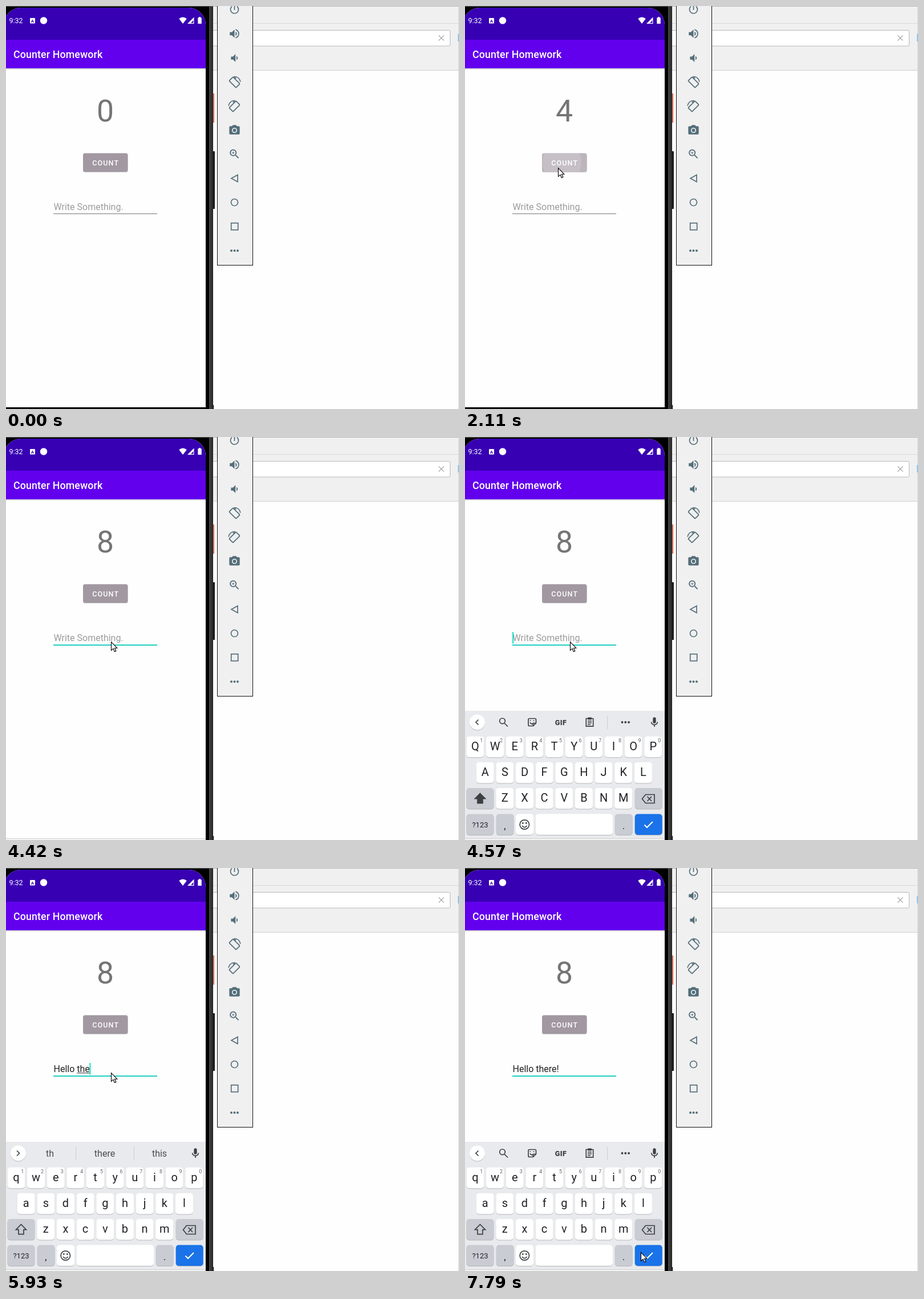
An HTML page for the animation above (8 s loop, 794 by 705 pixels).

```html
<!DOCTYPE html>
<html lang="en">
<head>
<meta charset="utf-8">
<title>Counter</title>
<style>
  html, body { margin: 0; width: 100%; height: 100%; overflow: hidden; background: #fefefe; }
  svg { display: block; width: 794px; height: 705px; }
  text { font-family: Roboto, "Open Sans", sans-serif; white-space: pre; }
  .mid { text-anchor: middle; }
  .line { fill: none; stroke: #546e7a; stroke-width: 1.7; }
  .dark { fill: none; stroke: #3c4043; stroke-width: 1.7; }
  .key { filter: drop-shadow(0 1px .4px rgba(0, 0, 0, .22)); }
  .hint { font-size: 9px; fill: #5f6368; }
  .word { font-size: 16px; fill: #474b50; text-anchor: middle; }
</style>
</head>
<body>
<svg viewBox="0 0 794 705">
  <defs>
    <clipPath id="screen"><path d="M-4 705V33A30 30 0 0 1 26 3H320A30 30 0 0 1 350 33V705Z"/></clipPath>
    <clipPath id="buttonClip"><rect x="135" y="257.5" width="78.5" height="32.5" rx="3.5"/></clipPath>
    <linearGradient id="barShadow" x2="0" y2="1">
      <stop stop-color="#000" stop-opacity=".2"/><stop offset="1" stop-color="#000" stop-opacity="0"/>
    </linearGradient>
  </defs>

  <!-- browser behind -->
  <rect width="794" height="705" fill="#fefefe"/>
  <rect x="363" width="431" height="112" fill="#f0f0f0"/>
  <path d="M363 .5H794" stroke="#b4b4b4"/>
  <path d="M363 30.5H794" stroke="#d9d9d9"/>
  <path d="M363 112.5H794" stroke="#cfcfcf"/>
  <path d="M793.5 0V705" stroke="#d4d4d4"/>
  <rect x="340.5" y="42.5" width="438" height="27.5" rx="2" fill="#fff" stroke="#b8b8b8"/>
  <path d="M758.5 51.5l9 9m0-9l-9 9" stroke="#a2a2a2" stroke-width="1.2"/>
  <path d="M793 49V62" stroke="#8fc3ee" stroke-width="2"/>
  <rect x="362" y="153" width="3.2" height="51" fill="#e2765f"/>

  <!-- phone -->
  <rect width="357" height="705" fill="#000"/>
  <path d="M0 .5H363" stroke="#666"/>
  <rect x="356" y="1" width="7" height="704" fill="#333"/>
  <path d="M357 1V705" stroke="#5a5a5a"/>
  <path d="M362.5 1V705" stroke="#1c1c1c"/>
  <rect x="362" y="254" width="4" height="101" rx="1" fill="#1d1d1d"/>
  <rect x="363" y="698" width="1.2" height="7" fill="#222"/>
  <g clip-path="url(#screen)">
    <rect y="3" width="350" height="699" fill="#fefefe"/>
    <rect x="-4" y="3" width="354" height="56" fill="#3700b3"/>
    <rect y="59" width="350" height="50" fill="#6200ee"/>
    <rect y="109" width="350" height="3" fill="url(#barShadow)"/>
    <g fill="#fff">
      <text x="5.5" y="30" font-size="12.5">9:32</text>
      <rect x="42" y="21" width="9" height="9.5" rx="1"/>
      <circle cx="66" cy="25.5" r="6.2"/>
      <path d="M303.3 22.2Q310 16.8 316.8 22.2L310 31Z"/>
      <path d="M329.5 19.5V31H318Z"/>
      <path d="M336.3 20.5H338V19H341V20.5H342.8V31H336.3Z"/>
      <text x="13" y="91" font-size="17.8" font-weight="500" letter-spacing=".13">Counter Homework</text>
    </g>
    <path d="M324 29.8H328.300V25Z" fill="#3700b3"/>
    <text class="mid" x="46.500" y="29" font-size="8" font-weight="700" fill="#3700b3">A</text>

    <text id="count" class="mid" x="174" y="202" font-size="53.500" fill="#757575">0</text>
    <rect class="key" x="135" y="257.500" width="78.500" height="32.500" rx="3.500" fill="#a298a2"/>
    <g clip-path="url(#buttonClip)" fill="#fff">
      <rect id="glow" x="135" y="257" width="79" height="33"/>
      <circle id="ripple" cx="170" cy="274"/>
    </g>
    <text x="151.300" y="278.500" font-size="12.500" font-weight="500" letter-spacing="1.110" fill="#fff">COUNT</text>

    <text id="entry" x="83.500" y="357" font-size="16"></text>
    <rect id="compose" y="358.200" height="1" fill="#333"/>
    <rect id="field" x="83" y="363" width="182"/>
    <rect id="caret" y="341" width="1.800" height="20.500" fill="#03dac5"/>

    <g id="navBar">
      <rect y="702" width="350" height="3" fill="#f5f5f5"/>
      <path d="M0 702.500H350" stroke="#cfcfcf"/>
    </g>
    <g id="board">
      <rect y="479" width="350" height="223" fill="#e8eaed"/>
      <circle class="key" cx="21.500" cy="499" r="13.500" fill="#fff"/>
      <path id="chevron" class="dark"/>
      <g id="keys"></g>
      <g id="words">
        <path d="M122.500 488V511M224.500 488V511" stroke="#cdd0d4"/>
        <text class="word" x="77" y="505"></text>
        <text class="word" x="173" y="505"></text>
        <text class="word" x="269" y="505"></text>
      </g>
      <g id="tools">
        <circle class="dark" cx="65.500" cy="496.800" r="4.800"/>
        <path class="dark" stroke-width="2" d="M69 500.500L75 506.500"/>
        <path class="dark" d="M113 492.500H122.500Q124.500 492.500 124.500 494.500V500.500L119.500 505.500H113Q111 505.500 111 503.500V494.500Q111 492.500 113 492.500ZM124.500 500.500H119.500V505.500M114 499.500Q116 503 119 501.500M114.500 495.500V497M120.500 495.500V497"/>
        <text class="mid" x="168" y="503.500" font-size="12.500" font-weight="900" letter-spacing=".4" fill="#3c4043">GIF</text>
        <path class="dark" d="M212.300 492.500H224.700V506.200H212.300ZM215 497H222M215 500H222M215 503H220"/>
        <rect x="215" y="490.500" width="7" height="4" rx="1" fill="#3c4043"/>
        <path d="M249.500 488V511" stroke="#cdd0d4"/>
        <g fill="#3c4043"><circle cx="275.500" cy="499" r="1.900"/><circle cx="281.300" cy="499" r="1.900"/><circle cx="287.100" cy="499" r="1.900"/></g>
      </g>
      <path id="shift" class="dark" d="M26.500 623.500L35.500 632.700H31V640.700H22V632.700H17.500Z"/>
      <path class="dark" d="M316.500 625.500H332V640.500H316.500L310.500 633ZM319.500 629L327 637M327 629L319.500 637"/>
      <circle class="dark" cx="104.300" cy="678" r="8.200"/>
      <path class="dark" d="M100 680Q104.300 685.500 108.600 680"/>
      <g fill="#3c4043"><circle cx="101.300" cy="675.500" r="1.400"/><circle cx="107.300" cy="675.500" r="1.400"/></g>
      <path d="M314.500 678.500L319 683L329 673" fill="none" stroke="#fff" stroke-width="2"/>
    </g>
  </g>

  <!-- side panel -->
  <rect x="370.500" y="-2" width="62" height="455.500" fill="#f0f0f0" stroke="#111"/>
  <g id="panel" fill="#546e7a" fill-rule="evenodd"></g>
  <g transform="translate(400.500 133.500)" class="line">
    <rect x="-8.500" y="-4.800" width="17" height="9.600" rx="1" transform="rotate(45)"/>
    <path d="M-1 -10Q8.500 -10 10.500 -1M-1 -10L2.500 -6.500"/>
  </g>
  <g transform="translate(400.500 175.500) scale(-1 1)" class="line">
    <rect x="-8.500" y="-4.800" width="17" height="9.600" rx="1" transform="rotate(45)"/>
    <path d="M-1 -10Q8.500 -10 10.500 -1M-1 -10L2.500 -6.500"/>
  </g>
  <path class="line" d="M406 295.500V307.500L395 301.500Z"/>
  <circle class="line" cx="400.500" cy="343.500" r="6"/>
  <rect class="line" x="394.700" y="379.700" width="12" height="12"/>
  <g fill="#546e7a"><circle cx="395" cy="428" r="2"/><circle cx="400.500" cy="428" r="2"/><circle cx="406" cy="428" r="2"/></g>

  <path id="cursor" d="M.5 .5V15.300L4 12.200L6.300 17.600L8.800 16.500L6.500 11.200H10.800Z" fill="#fff" stroke="#000" stroke-width="1.100"/>
</svg>
<script>
const LOOP = 8000;
const $ = id => document.getElementById(id);
const svgNS = 'http://www.w3.org/2000/svg';

function add(parent, tag, attrs, label) {
  const el = document.createElementNS(svgNS, tag);
  set(el, attrs);
  if (label) el.textContent = label;
  parent.append(el);
  return el;
}
function set(el, attrs) {
  for (const name in attrs) el.setAttribute(name, attrs[name]);
}
const show = (id, on) => $(id).style.display = on ? '' : 'none';

function icon(parent, d, x, y, size) {
  const k = size / 24;
  return add(parent, 'path', { d, transform: `translate(${x - size / 2} ${y - size / 2}) scale(${k})` });
}

const panel = $('panel');
icon(panel, 'M13 3h-2v10h2V3zm4.83 2.17l-1.42 1.42A6.92 6.92 0 0 1 19 12A7 7 0 1 1 7.58 6.58L6.17 5.17A8.93 8.93 0 0 0 3 12a9 9 0 0 0 18 0c0-2.74-1.23-5.18-3.17-6.83z', 400.5, 6, 21);
icon(panel, 'M3 9v6h4l5 5V4L7 9zm13.5 3A4.5 4.5 0 0 0 14 7.97v8.05A4.5 4.5 0 0 0 16.5 12zM14 3.23v2.06a7 7 0 0 1 0 13.42v2.06a9 9 0 0 0 0-17.54z', 400.5, 48.5, 22);
icon(panel, 'M18.5 12A4.5 4.5 0 0 0 16 7.97v8.05A4.5 4.5 0 0 0 18.500 12zM5 9v6h4l5 5V4L9 9z', 400.5, 91, 21);
icon(panel, 'M12 8.8a3.2 3.2 0 1 0 0 6.4a3.2 3.2 0 0 0 0-6.4zM9 2L7.17 4H4a2 2 0 0 0-2 2v12a2 2 0 0 0 2 2h16a2 2 0 0 0 2-2V6a2 2 0 0 0-2-2h-3.17L15 2zm3 15a5 5 0 1 1 0-10a5 5 0 0 1 0 10z', 400.5, 217.5, 22);
icon(panel, 'M15.5 14h-.8l-.3-.3A6.500 6.500 0 1 0 13.700 14.400l.3.3v.8l5 5L20.500 19zm-6 0a4.500 4.500 0 1 1 0-9a4.500 4.500 0 0 1 0 9zM12 10h-2v2H9v-2H7V9h2V7h1v2h2z', 400.5, 259, 22);
icon($('board'), 'M12 14a3 3 0 0 0 3-3V5a3 3 0 0 0-6 0v6a3 3 0 0 0 3 3zm5.3-3a5.3 5.100 0 0 1-10.600 0H5a7 7 0 0 0 6 6.720V21h2v-3.280A7 7 0 0 0 19 11z', 332, 499, 21).setAttribute('fill', '#3c4043');

// Keyboard
const PITCH = 34.65;
const letters = [];
const keys = $('keys');
function key(x, y, width, fill) {
  add(keys, 'rect', { class: 'key', x, y, width, height: 36.5, rx: 5, fill });
}
function label(x, y, size, text) {
  return add(keys, 'text', { class: 'mid', x, y, 'font-size': size, fill: '#202124' }, text);
}
[['qwertyuiop', 17.9, 523.8], ['asdfghjkl', 35.2, 569], ['zxcvbnm', 69.8, 614]].forEach(([row, first, top], r) => {
  [...row].forEach((ch, i) => {
    const x = first + i * PITCH;
    key(x - 15.5, top, 31, '#fff');
    letters.push([label(x, top + 24.3, 20, ch), ch]);
    if (r === 0) add(keys, 'text', { class: 'hint mid', x: x + 11, y: 534 }, String((i + 1) % 10));
  });
});
const GREY = '#c9ccd2';
key(2.5, 614, 48, GREY);
key(297.7, 614, 48, GREY);
key(2.5, 659.5, 48, GREY);
key(54.7, 659.5, 31, GREY);
key(89, 659.5, 31, '#fff');
key(123.5, 659.5, 135.5, '#fff');
key(262.7, 659.5, 31, GREY);
key(297.7, 659.5, 48, '#1a73e8');
label(26.5, 683, 13, '?123');
label(70, 685.5, 17, ',');
label(278, 685.5, 17, '.');

// Stepped tracks: [start ms, value]
const presses = [1720, 1860, 1990, 2110, 2260, 2400, 2540, 2680];
const counts = [[0, 0], ...presses.map((t, i) => [t, i + 1])];
// [overlay, ripple opacity, ripple radius]
const ripples = [
  [0, [0, 0, 0]],
  ...presses.map((t, i) => [t, i ? [.28, .15, i % 2 ? 34 : 26] : [.1, .18, 22]]),
  [2830, [.13, 0, 0]], [2950, [0, 0, 0]]
];
const cursors = [
  [0, null], [590, [238, 480]], [730, [226, 424]], [870, [206, 364]], [1020, [184, 316]],
  [1160, [169, 291]], [1310, [163, 283]], [3100, [169, 306]], [3250, [179, 340]], [3400, [184, 358]],
  [7090, [222, 430]], [7370, [262, 540]], [7510, [290, 622]], [7650, [303, 660]], [7790, [308, 672]]
];
const entries = [
  [0, ''], [5000, 'H'], [5130, 'Hel'], [5270, 'Hell'], [5410, 'Hello'], [5540, 'Hello '],
  [5660, 'Hello t'], [5800, 'Hello th'], [5930, 'Hello the'], [6240, 'Hello ther'],
  [6380, 'Hello there'], [6650, 'Hello there!']
];
const words = [
  [0, ''], [5130, 'H|He|Hey'], [5270, 'Hel|Hello|Help'], [5410, 'Hell|Hello|Hells'],
  [5540, 'Hello|Hellos|Help'], [5660, 'there|and|my'], [5800, 't|the|to'], [5930, 'th|there|this'],
  [6240, 'the|there|they'], [6380, 'ther|there|they'], [6510, 'there|there\u2019s|therefore'],
  [6780, 'there|there!|therefore'], [7090, '']
];
const carets = [[0, false], [3770, true], [4300, false], [4570, true], [7370, false]];

const at = (track, t) => track.reduce((value, step) => step[0] <= t ? step[1] : value, track[0][1]);

const entry = $('entry');
const wordLabels = $('words').querySelectorAll('text');

function draw(t) {
  $('count').textContent = at(counts, t);
  const [glow, strength, radius] = at(ripples, t);
  set($('glow'), { opacity: glow });
  set($('ripple'), { opacity: strength, r: radius });

  const pos = at(cursors, t);
  show('cursor', pos);
  if (pos) set($('cursor'), { transform: `translate(${pos})` });

  const typed = at(entries, t);
  const focused = t >= 3640;
  entry.textContent = (typed || 'Write Something.').replace(/ /g, '\u00a0');
  set(entry, { fill: typed ? '#222' : '#9c9c9c' });
  set($('field'), focused ? { height: 2, fill: '#22cfc0' } : { height: 1, fill: '#777' });

  const width = typed ? entry.getComputedTextLength() : 0;
  const start = typed.lastIndexOf(' ') + 1;
  const lead = start ? entry.getSubStringLength(0, start) : 0;
  const composing = typed && !typed.endsWith('!');
  set($('compose'), { x: 83.5 + lead, width: composing ? width - lead : 0 });
  set($('caret'), { x: 83.2 + width });
  show('caret', at(carets, t));

  const open = t >= 4570;
  show('navBar', t >= 4420);
  show('board', open);
  if (!open) return;
  const caps = !typed;
  letters.forEach(([el, ch]) => el.textContent = caps ? ch.toUpperCase() : ch);
  $('shift').style.fill = caps ? '#3c4043' : 'none';
  const list = at(words, t);
  show('words', list);
  show('tools', !list);
  list.split('|').forEach((word, i) => wordLabels[i].textContent = word);
  set($('chevron'), { d: list ? 'M19 494.500L23.500 499L19 503.500' : 'M23.500 494.500L19 499L23.500 503.500' });
}

const begin = performance.now();
function tick() {
  draw((performance.now() - begin) % LOOP);
  requestAnimationFrame(tick);
}
tick();
</script>
</body>
</html>
```
